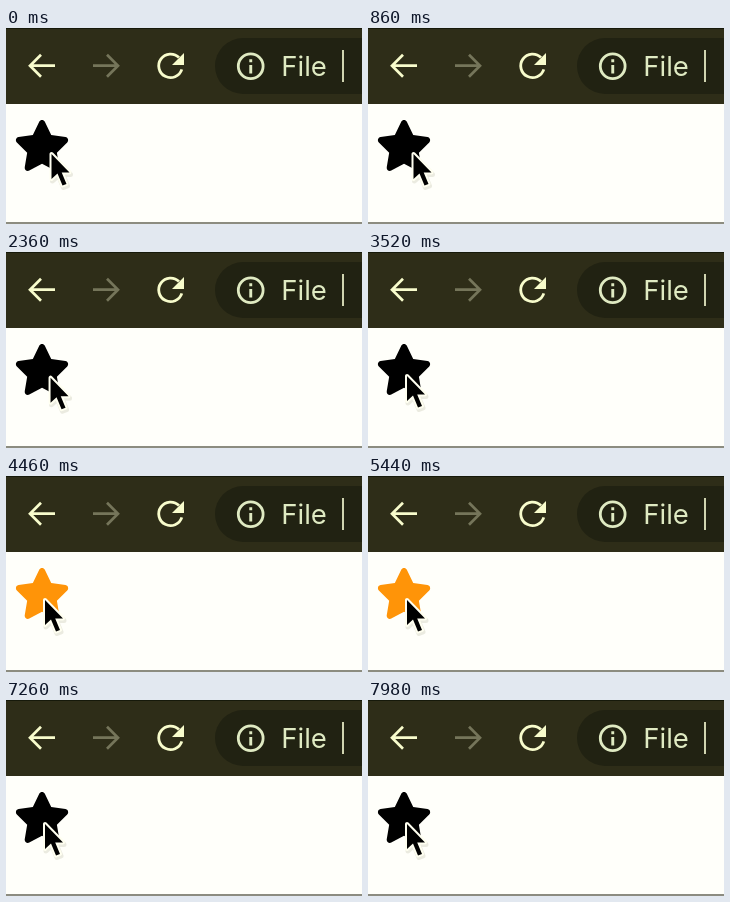
An HTML page for the animation above (8000 ms loop, 356x196 px).

```html
<!DOCTYPE html>
<html lang="en">
<head>
<meta charset="utf-8">
<title>Star toggle</title>
<style>
  html, body { margin: 0; width: 100%; height: 100%; overflow: hidden; background: #fffffa; }
  svg { display: block; width: 356px; height: 196px; }
  text { font: 27.5px Inter, Arial, sans-serif; }
</style>
</head>
<body>
<svg viewBox="0 0 356 196">
  <defs>
    <path id="arrow" d="M13 0H-11M-1-11-12 0-1 11" fill="none" stroke-width="2.7"/>
    <path id="pointer" d="M0 0V25L6 19.5 11 31.5 15 30 10.2 18.5H18Z"/>
  </defs>

  <!-- Toolbar -->
  <rect width="356" height="76" fill="#2e2d18"/>
  <rect width="356" height="1" fill="#16190a"/>
  <rect x="209" y="10" width="200" height="56" rx="28" fill="#212212"/>
  <use href="#arrow" transform="translate(36 37.7)" stroke="#f8fccc"/>
  <use href="#arrow" transform="translate(100 37.7) scale(-1 1)" stroke="#75755a"/>
  <g fill="none" stroke="#f8fccc" stroke-width="2.8">
    <path d="M175.8 41.4A11.8 11.8 0 1 1 173 29.6"/>
    <path d="M178 25V37H166Z" fill="#f8fccc" stroke="none"/>
  </g>
  <g fill="#dfeac2">
    <circle cx="244.7" cy="38.3" r="12.4" fill="none" stroke="#dfeac2" stroke-width="2.8"/>
    <path d="M243.3 31.3h2.9v3h-2.9zM243.3 37h2.9v8.5h-2.9z"/>
    <text x="275.3" y="48">File</text>
    <rect x="336" y="22" width="2" height="32" fill="#d0d4b0"/>
  </g>

  <!-- Page -->
  <rect y="194" width="356" height="2" fill="#8c8c80"/>
  <path id="star" transform="translate(7.9 92) scale(.0977 .0995)"
    d="M259.3 17.8L194 150.2 47.9 171.5c-26.2 3.8-36.7 36.1-17.7 54.6l105.7 103-25 145.5c-4.5 26.3 23.2 46 46.4 33.7L288 439.6l130.7 68.7c23.2 12.2 50.9-7.4 46.4-33.7l-25-145.5 105.7-103c19-18.5 8.5-50.8-17.7-54.6L382 150.2 316.7 17.8c-11.7-23.6-45.6-23.9-57.4 0z"/>
  <g id="cursor" stroke-linejoin="round">
    <use href="#pointer" transform="translate(1 2)" stroke="#77774c" stroke-width="5" opacity=".14"/>
    <use href="#pointer" stroke="#fffff0" stroke-width="4"/>
    <use href="#pointer"/>
  </g>
</svg>
<script>
  const LOOP = 8000;
  const star = document.getElementById("star");
  const cursor = document.getElementById("cursor");

  const progress = (t, from, to) => Math.min(1, Math.max(0, (t - from) / (to - from)));
  const smooth = p => p * p * (3 - 2 * p);
  const hump = p => Math.sin(Math.PI * p) ** 2;

  function draw(now) {
    const t = now % LOOP;
    const approach = smooth(progress(t, 2000, 3500));
    const wander = hump(progress(t, 5450, 7250));
    const x = 45.5 - 6.5 * approach + 5.5 * wander;
    const y = 126 - 2 * approach + 8.5 * wander;
    const selected = t >= 4400 && t < 7150;

    star.setAttribute("fill", selected ? "#ff9408" : "#000");
    cursor.setAttribute("transform", `translate(${x} ${y})`);
    requestAnimationFrame(draw);
  }

  draw(performance.now());
</script>
</body>
</html>
```
